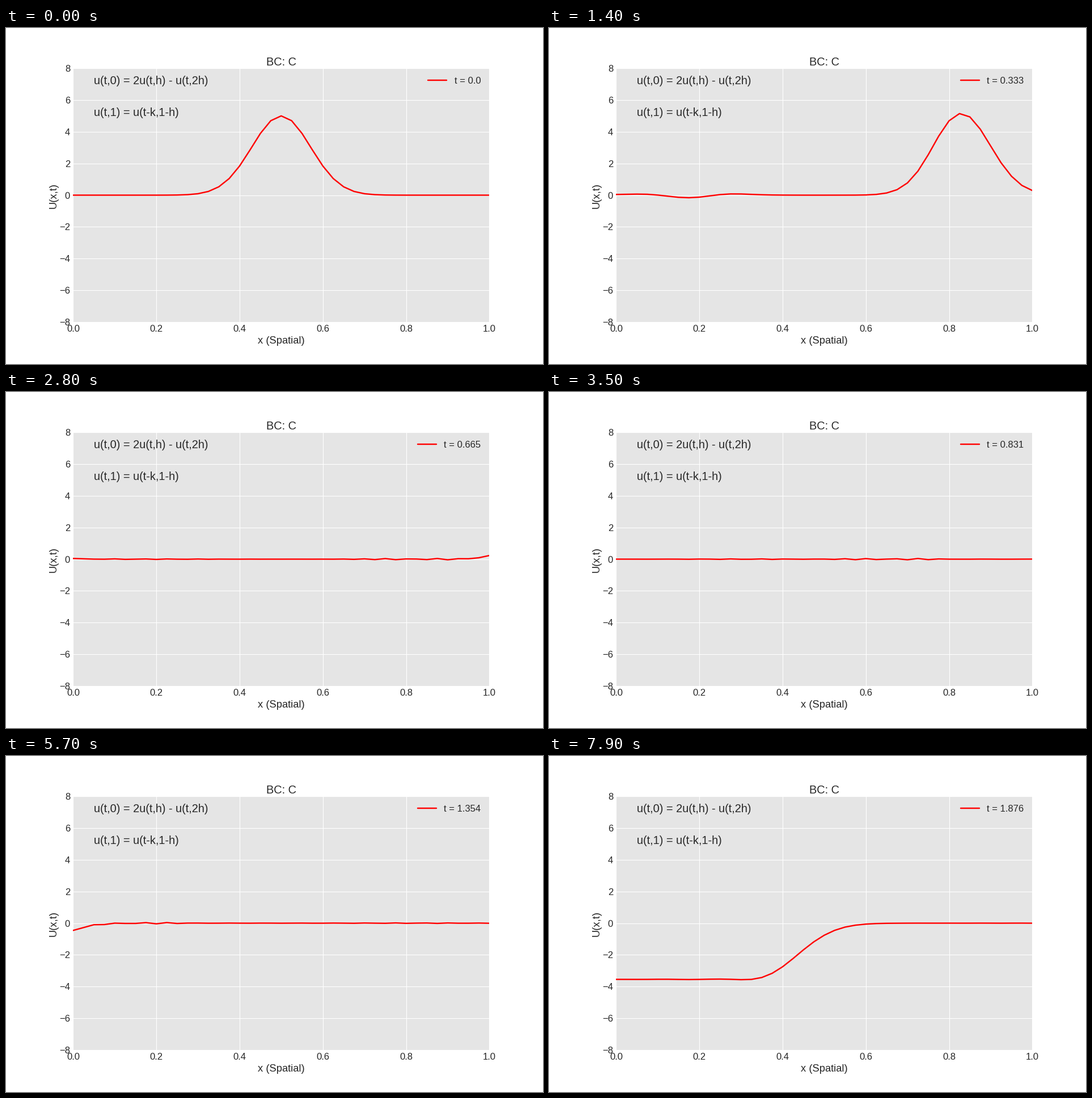
Animation, 947 px wide and 592 px high, one loop 8 s. Source, as a matplotlib script:

```python
import numpy as np
import matplotlib.pyplot as plt
from matplotlib.animation import FuncAnimation

W, H, DPI = 947, 592, 100
FRAMES, INTERVAL = 80, 100
INK = "0.15"

plt.rcParams.update({
    "font.family": "Liberation Sans",
    "text.color": INK,
    "axes.unicode_minus": True,
})

CELLS = 40
h = 1 / CELLS
lam = 0.95
k = lam * h
x = np.linspace(0, 1, CELLS + 1)


def solve(steps):
    """Leapfrog advection of a Gaussian, started with one Euler step."""
    u = np.zeros((steps, x.size))
    u[0] = 5 * np.exp(-100 * (x - 0.5) ** 2)
    for n in range(1, steps):
        now = u[n - 1]
        slope = now[2:] - now[:-2]
        if n == 1:
            u[n, 1:-1] = now[1:-1] - lam / 2 * slope
        else:
            u[n, 1:-1] = u[n - 2, 1:-1] - lam * slope
        u[n, 0] = 2 * u[n, 1] - u[n, 2]
        u[n, -1] = now[-2]
    return u


u = solve(FRAMES)

fig = plt.figure(figsize=(W / DPI, H / DPI), dpi=DPI, facecolor="white")
ax = fig.add_axes([0.125, 0.125, 0.775, 0.755], facecolor="#E5E5E5")
ax.set(xlim=(0, 1), ylim=(-8, 8),
       xticks=np.linspace(0, 1, 6), yticks=np.arange(-8, 9, 2))
ax.grid(color="white", linewidth=0.8)
ax.set_axisbelow(True)
ax.tick_params(length=0, pad=3.8, labelsize=12, labelcolor=INK)
for spine in ax.spines.values():
    spine.set_visible(False)


def label(px, py, text, size, angle=0):
    fig.text(px / W, 1 - py / H, text, fontsize=size, rotation=angle,
             rotation_mode="anchor", ha="center", va="baseline")


label(485.3, 66, "BC: C", 14.4)
label(485.3, 556.2, "x (Spatial)", 13.2)
label(88.5, 295.5, "U(x,t)", 13.2, 90)
ax.text(0.05, 7, "u(t,0) = 2u(t,h) - u(t,2h)", fontsize=14.4)
ax.text(0.05, 5, "u(t,1) = u(t-k,1-h)", fontsize=14.4)

line, = ax.plot(x, u[0], color="red", linewidth=1.75,
                solid_capstyle="round", label="t = 0.0")
legend = ax.legend(loc="upper right", frameon=False, fontsize=12)
clock = legend.get_texts()[0]


def update(n):
    line.set_ydata(u[n])
    clock.set_text(f"t = {round(n * 0.02375, 3)}")
    return line, clock


anim = FuncAnimation(fig, update, frames=FRAMES, interval=INTERVAL,
                     repeat=True, repeat_delay=0)
plt.show()
```
